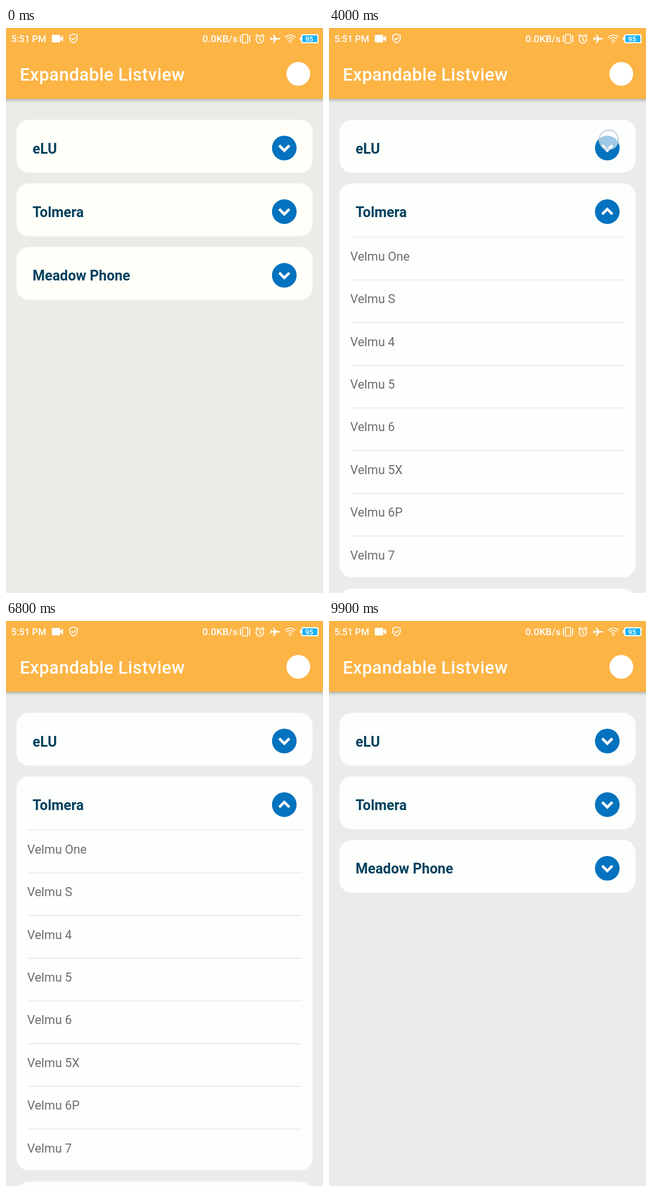
Animation, 561 px wide and 998 px high, one loop 10000 ms. Source, as an HTML page with a canvas:

```html
<!DOCTYPE html>
<html lang="en">
<head>
<meta charset="utf-8">
<title>Expandable Listview</title>
<style>
  html, body { margin: 0; width: 100%; height: 100%; overflow: hidden; background: #ebecea; }
  canvas { display: block; }
</style>
</head>
<body>
<canvas id="stage" width="561" height="998"></canvas>
<script>
const ctx = document.getElementById('stage').getContext('2d');
const LOOP = 10000, STEP = 100, SLIDE = 300, TAP = 200;
const TOP = 162, CLOSED = 93.5, PITCH = 112.4, ROW = 75.43;
const WARM = { page: '#edebe6', card: '#fefff8' };
const COOL = { page: '#ebecea', card: '#fdfffc' };

const named = (prefix, models) => models.split(' ').map(m => prefix + ' ' + m);
const cards = [
  { title: 'eLU', open: 4100, close: 5900, rows: named('Kelbru', '4 4S 5 5S 6 6S 7 8') },
  { title: 'Tolmera', open: 3000, close: 7400, rows: named('Velmu', 'One S 4 5 6 5X 6P 7') },
  { title: 'Meadow Phone', open: 1500, close: 8800, rows: named('Tarvo Belna', '800 710 900 610 510 820 920') }
];

const clamp = v => Math.max(0, Math.min(1, v));
const ease = v => v < 0.5 ? 4 * v ** 3 : 1 - (2 - 2 * v) ** 3 / 2;
const ramp = (t, start) => ease(clamp((t - start) / SLIDE));

function text(str, x, y, size, weight, color, spacing = 0) {
  ctx.font = `${weight} ${size}px Roboto, sans-serif`;
  ctx.letterSpacing = spacing + 'px';
  ctx.fillStyle = color;
  ctx.fillText(str, x, y);
}

function box(x, y, w, h, r, color) {
  ctx.fillStyle = color;
  ctx.beginPath();
  ctx.roundRect(x, y, w, h, r);
  ctx.fill();
}

function disc(x, y, r, color) {
  ctx.fillStyle = color;
  ctx.beginPath();
  ctx.arc(x, y, r, 0, 7);
  ctx.fill();
}

function stroke(path, width, color = '#fff') {
  ctx.strokeStyle = color;
  ctx.lineWidth = width;
  ctx.stroke(new Path2D(path));
}

function fill(path) {
  ctx.fillStyle = '#fff';
  ctx.fill(new Path2D(path));
}

function drawStatusBar() {
  text('5:51 PM', 9.5, 25, 16.5, 500, '#fff');
  box(81, 12, 15, 13.5, 2, '#fff');
  fill('M95 18.5l6-5v11z');
  stroke('M119.5 10.5l6.5 2.5v5c0 4-3 7-6.5 8.5c-3.5-1.5-6.5-4.5-6.5-8.5v-5z M116 18l2.7 2.7l4.6-4.7', 1.7);

  text('0.0KB/s', 347.5, 25, 17.4, 500, '#fff');
  stroke('M418.5 11.5h9v15h-9z M415.5 13l-1.5 2l1.5 2l-1.5 2l1.5 2l-1.5 2l1.5 2 M430.5 13l1.5 2l-1.5 2l1.5 2l-1.5 2l1.5 2l-1.5 2', 1.6);
  stroke('M442.5 20a6.7 6.7 0 1 0 13.4 0a6.7 6.7 0 1 0-13.4 0 M449 16v4.5l3 2 M441.5 14.5l4-3.5 M457 14.5l-4-3.5', 1.7);
  fill('M485 19c0-1-1-1.3-2-1.3h-4.5l-4.5-6.2h-1.7l2 6.2h-3.800l-1.500-1.700h-1.500l1 3l-1 3h1.500l1.500-1.700h3.800l-2 6.200h1.700l4.500-6.200h4.500c1 0 2-.3 2-1.300z');
  stroke('M493.5 16.5q9.5-8 19 0 M496.5 19.5q6.5-5.5 13 0 M499.5 22.5q3.5-3 7 0', 1.6);
  disc(503, 25, 1.4, '#fff');

  box(520, 16, 4, 6, 1, '#fff');
  box(522.5, 11, 30.5, 16, 3, '#fff');
  box(524.5, 13, 26.5, 12, 1.5, '#1ab2f2');
  text('95', 529.5, 23.5, 12.5, 500, '#fff');
}

function drawHeader() {
  ctx.save();
  ctx.shadowColor = 'rgba(0,0,0,.32)';
  ctx.shadowBlur = 6;
  ctx.shadowOffsetY = 2;
  box(-10, -10, 581, 135, 0, '#fcb445');
  ctx.restore();
  drawStatusBar();
  text('Expandable Listview', 24.5, 93, 31.2, 500, '#fffdf8', 0.4);
  disc(517.3, 81, 21, '#fff');
}

function drawCard(card, y, t, color) {
  const isOpen = t >= card.open && t < card.close;
  box(18.5, y, 524, CLOSED + (isOpen ? card.rows.length * ROW - 1 : 0), 22, color);
  text(card.title, 47, y + 59.5, 24.9, 700, '#03415f');
  disc(492.5, y + 50, 21.8, '#0372bf');
  stroke(isOpen
    ? `M483.5 ${y + 54.5}l9-9l9 9`
    : `M483.5 ${y + 45.5}l9 9l9-9`, 4.6);

  if (!isOpen) return;
  ctx.globalAlpha = ramp(t, card.open);
  card.rows.forEach((name, i) => {
    const rowY = y + 94.3 + i * ROW;
    box(37.5, rowY, 486, 1.4, 0, '#e6e8e6');
    text(name, 37.5, rowY + 42, 21.8, 400, '#6d6e6d');
  });
  ctx.globalAlpha = 1;
}

function drawTouch(y) {
  disc(495, y + 35.5, 17, 'rgba(255,255,255,.62)');
  ctx.strokeStyle = 'rgba(165,195,212,.65)';
  ctx.lineWidth = 2.5;
  ctx.stroke();
}

function draw(t) {
  const tone = t < cards[2].open ? WARM : COOL;
  ctx.fillStyle = tone.page;
  ctx.fillRect(0, 0, 561, 998);
  let shift = 0, touchY = null;
  cards.forEach((card, i) => {
    const y = TOP + i * PITCH + shift;
    drawCard(card, y, t, tone.card);
    if ([card.open, card.close].some(at => t >= at - TAP && t < at)) touchY = y;
    shift += (ramp(t, card.open) - ramp(t, card.close)) * card.rows.length * ROW;
  });
  drawHeader();
  if (touchY !== null) drawTouch(touchY);
}

// The picture advances ten times a second, like a screen recording.
function tick() {
  draw(Math.floor(performance.now() % LOOP / STEP) * STEP);
  requestAnimationFrame(tick);
}
tick();
</script>
</body>
</html>
```
